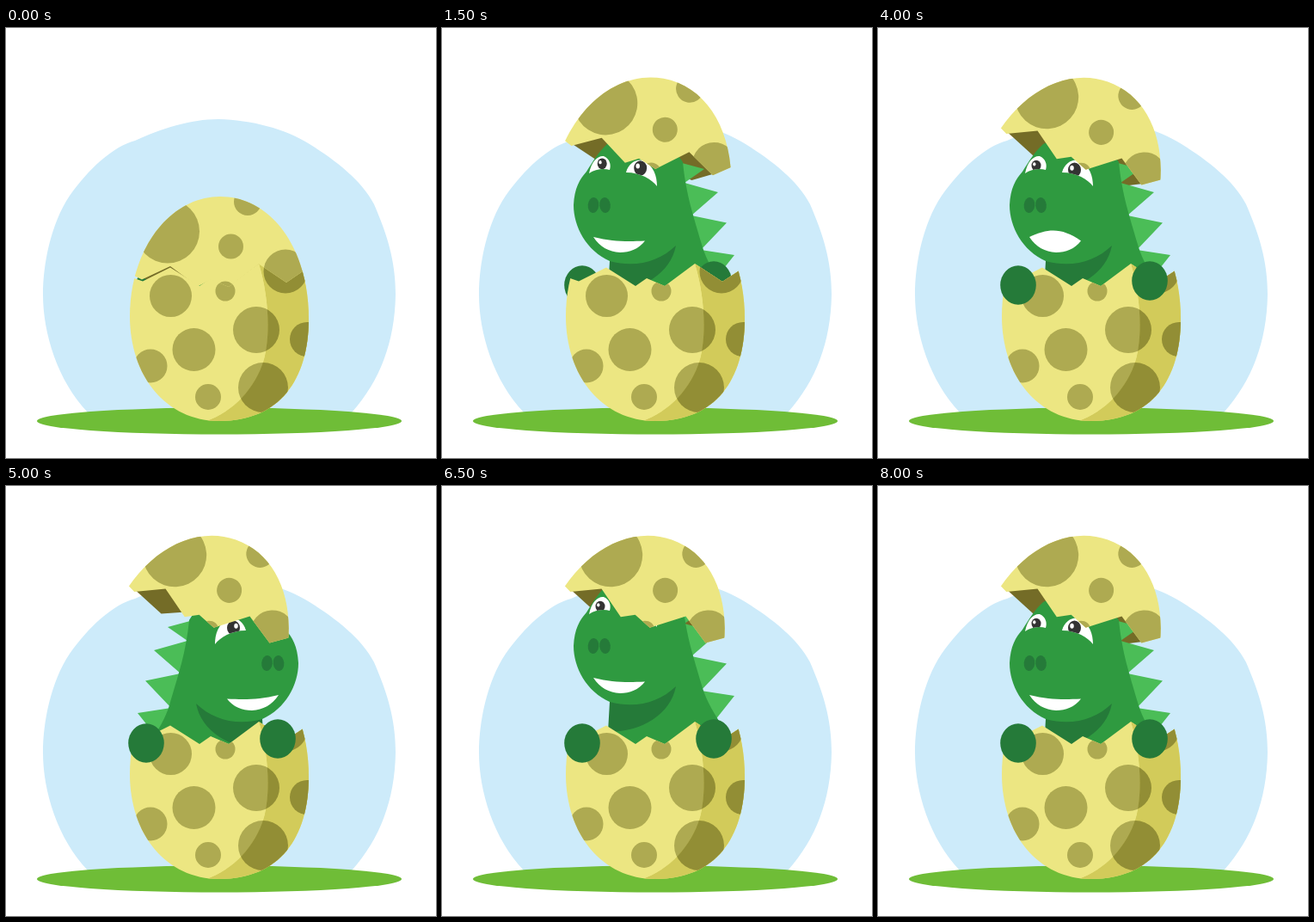
Write an HTML page with a canvas that moves like this. It is 500x500 px and loops after 9 s.

```html
<!DOCTYPE html>
<html lang="en">
<head>
<meta charset="utf-8">
<title>Hatching egg</title>
<style>
html, body { margin: 0; width: 100%; height: 100%; overflow: hidden; background: #fff; }
canvas { display: block; }
</style>
</head>
<body>
<canvas id="stage" width="500" height="500"></canvas>
<script>
const g = document.getElementById('stage').getContext('2d');
const P = d => new Path2D(d);

const GREEN = '#2f9a40', LIGHT = '#4bbd57', DARK = '#257a39';
const YELLOW = '#ece682', SPOT = '#aeaa51', SHADE = '#d2cb5a', SHADE_SPOT = '#928e35', INNER = '#746c27';

const sky = P('M95 447C60 410 43 355 43 310C43 275 52 228 74 195C96 164 124 138 150 131C180 117 215 106 247 106C285 107 325 117 353 135C385 155 414 178 428 205C443 240 453 270 453 310C452 365 435 410 402 447Z');
const egg = P('M249 196C309 196 352 257 352 338C352 409 318 457 248 457C186 457 144 405 144 335C144 258 190 196 249 196Z');
const capArea = P('M130 278L149 288L158 292.5L191 277L223 300.5L238 292.5L259 301L294 274.5L326 296L345 283L370 270V150H130Z');
const cupArea = P('M130 283L149 291L159 294.5L191 278.5L225 300L238 291L259 300L294 274L326 295L345 282.5L370 268V480H130Z');
const shade = P('M294 274C305 310 308 355 300 385C290 420 262 448 230 458H370V260Z');
const inner = P('M158 290L191 272L219 296L196 306ZM263 298L295 270L327 294L303 306Z');
const spots = [
  [188, 236.5, 37], [261.5, 254, 14.5], [281, 202, 16], [325, 283, 25.5],
  [191.5, 311.5, 24.5], [255, 306, 11.5], [218.5, 374, 25], [291, 351, 27],
  [168, 393, 19.5], [235, 429, 15], [299, 418, 29], [350, 362, 20]
];

const spikes = P('M279 157L305 164L282 180L321 191L290 218L331 226.5L301 258L340 264L317 293L290 290Z');
const body = P('M153 206C154 186 160 176 168 167C176 154 183 143 192 135C210 126 262 124 280 156C284 195 292 217 303 255Q309 275 330 305L300 345H196L195 271C168 259 153 231 153 206Z');
const neck = P('M272 253C266 285 233 306 193 306L195 271C225 279 252 272 272 253Z');
const eyes = [
  { white: P('M171 169C174 154 182 148 188 149C195 152 197 159 195 165C188 163 178 164 171 169Z'), x: 184, y: 160, r: 5.5 },
  { white: P('M214 168C217 157 226 152 234 154C246 160 250 172 250 184C244 176 231 168 214 168Z'), x: 228.5, y: 165, r: 7.5 }
];

// Linear value between one key per second
function key(s, keys) {
  const i = Math.min(Math.floor(s), keys.length - 2), u = Math.min(s - i, 1);
  return keys[i] + (keys[i + 1] - keys[i]) * u;
}

function fill(path, color) {
  g.fillStyle = color;
  g.fill(path);
}

function oval(x, y, rx, ry, color, turn = 0) {
  g.fillStyle = color;
  g.beginPath();
  g.ellipse(x, y, rx, ry, turn, 0, 2 * Math.PI);
  g.fill();
}

function group(draw) {
  g.save();
  draw();
  g.restore();
}

function mirror(axis, sx) {
  g.translate(axis, 0);
  g.scale(sx, 1);
  g.translate(-axis, 0);
}

function shell(area, shaded) {
  group(() => {
    g.clip(area);
    fill(egg, YELLOW);
    g.clip(egg);
    spots.forEach(([x, y, r]) => oval(x, y, r, r, SPOT));
    if (!shaded) return;
    g.clip(shade);
    fill(shade, SHADE);
    spots.forEach(([x, y, r]) => oval(x, y, r, r, SHADE_SPOT));
  });
}

function cap(s, draw) {
  group(() => {
    g.translate(key(s, [191, 186, 185.5]), key(s, [277, 136, 119.5]));
    g.rotate(key(s, [0, 1.8, 19.5]) * Math.PI / 180);
    g.translate(-191, -277);
    draw();
  });
}

function hands(s) {
  const k = key(s, [0.6, 1, 1]);
  group(() => {
    mirror(239.5, key(s, [1, 1, 1, -1, 1, 1]));
    oval(163, 299, 20.8 * k, 22.8 * k, DARK);
    oval(316, 294, 20.8 * k, 22.8 * k, DARK);
  });
}

function dino(s) {
  const look = key(s, [2.2, 2.2, 2.2, 1.1, 0, 0]);
  const open = key(s, [0, 0, 0, 0, 1, 0, 0]);
  group(() => {
    g.translate(key(s, [7, 0, 0]), key(s, [80, 0, 0, 0, 0, 0, 0, -40, 0]));
    mirror(246.5, key(s, [1, 1, 1, 1, 1, -1, 1, 1]));
    fill(spikes, LIGHT);
    fill(body, GREEN);
    fill(neck, DARK);
    oval(176, 206, 6.3, 9, DARK, 0.1);
    oval(189.5, 206, 6.3, 9, DARK, -0.1);
    const lip = 248.5 - 16 * open;
    fill(P(`M176 243C199 ${lip} 214 ${lip} 236 247.5C229 257 218 261 207 261C194 260 184 255 176 243Z`), '#fff');
    eyes.forEach(({ white, x, y, r }) => group(() => {
      fill(white, '#fff');
      g.clip(white);
      oval(x + look, y - look, r, r * 1.15, '#333');
      oval(x + look - r * 0.4, y - look - r * 0.3, r * 0.3, r * 0.4, '#fff');
    }));
  });
}

function draw(s) {
  const lining = () => cap(s, () => fill(inner, INNER));
  g.clearRect(0, 0, 500, 500);
  fill(sky, '#cdebfa');
  oval(248, 457, 212, 15.5, '#6fbd37');
  if (s > 1) lining();
  dino(s);
  if (s <= 2) hands(s);
  if (s <= 1) lining();
  shell(cupArea, true);
  cap(s, () => shell(capArea, false));
  if (s > 2) hands(s);
}

const start = performance.now();
function tick() {
  const t = (performance.now() - start) % 9000;
  draw(Math.min(Math.floor(t / 100) / 10, 8));
  requestAnimationFrame(tick);
}
tick();
</script>
</body>
</html>
```
